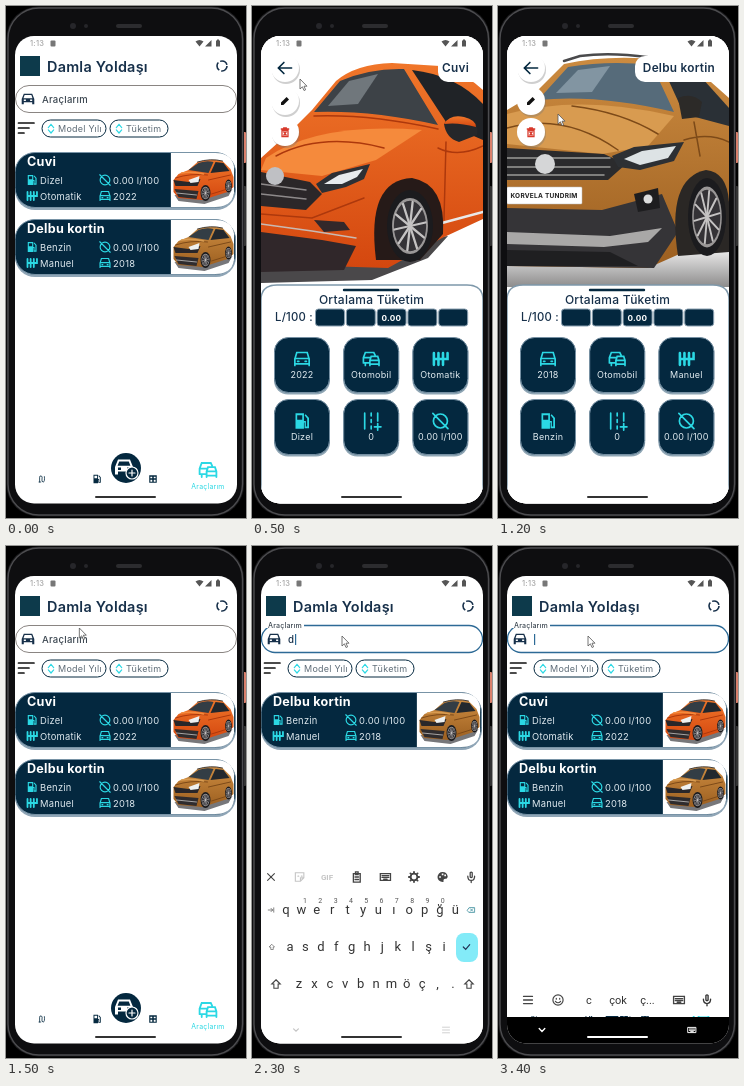
Write an HTML page that moves like this. It is 240 px wide and 512 px high and loops after 3500 ms.

```html
<!DOCTYPE html>
<html lang="tr">
<head>
<meta charset="utf-8">
<title>Araçlarım</title>
<style>
html, body { margin: 0; width: 100%; height: 100%; overflow: hidden; background: #000; }
svg { display: block; width: 240px; height: 512px; }
text { font-family: Inter, "Open Sans", sans-serif; letter-spacing: .25px; white-space: pre; }
.keys text { font-family: Roboto, sans-serif; letter-spacing: 0; }
</style>
</head>
<body>
<svg id="stage" viewBox="0 0 240 512"></svg>
<script>
const NAVY = '#04283f', CYAN = '#2bd8e4', INK = '#17304a';
const CARS = [
  { name: 'Cuvi', fuel: 'Dizel', gear: 'Otomatik', year: '2022', paint: 'url(#paint0)', shade: '#ad380c', light: '#f58a3c' },
  { name: 'Delbu kortin', fuel: 'Benzin', gear: 'Manuel', year: '2018', paint: 'url(#paint1)', shade: '#7d4a18', light: '#d89b50' }
];

// Icons are centred on 0,0 and about 12 units wide.
const ICONS = {
  car: ['M-6 5V0L-4 -5H4L6 0V5H4V3H-4V5ZM-4.3 -.8L-3.2 -3.7H3.2L4.3 -.8ZM-4 .4V2H-2V.4ZM2 .4V2H4V.4Z', 1],
  carLine: ['M-5.5 5V0L-4 -5H4L5.5 0V5M-5.5 -.4H5.5M-5.5 3.8H5.5M-3.4 1.8H-2.4M2.4 1.8H3.4'],
  cars: ['M-6 3V-1L-4.5 -5H2L3 -3M-6 -1H-1M-6 3H-2M-1 5V1L0 -2H5L6 1V5M-1 1H6M-1 4H6M-4.5 3V5'],
  fuel: ['M-5 6V-6H1.5V6ZM-3.7 -4.5V-1H.2V-4.5ZM1.5 0H3V4.2H4V-2L2 -4.4L2.8 -5.2L5.4 -2.4V5.5H2V1.2H1.5Z', 1],
  gear: ['M-5 -4.5V4.5M-1.5 -4.5V4.5M2 -4.5V4.5M5.5 -4.5V0H-5', 0, 2],
  none: ['M-5.4 0A5.4 5.4 0 1 0 5.4 0A5.4 5.4 0 1 0 -5.4 0M-5.8 -5.8L5.8 5.8'],
  road: ['M-5 -6V6M0 -6V-4M0 -1V1M0 4V6M5 -6V0M5 2V7M2.5 4.5H7.5'],
  sort: ['M-3 -1L0 -4.5L3 -1M-3 1.5L0 5L3 1.5'],
  back: ['M6 0H-6M-1 -5L-6 0L-1 5', 0, 1.5],
  pen: ['M-5 5V2L2 -5L5 -2L-2 5Z', 1],
  trash: ['M-4 -2V6H4V-2ZM-5 -4H5M-2 -5.5H2M-1.5 0L1.5 4M1.5 0L-1.5 4', 0, 1.7],
  route: ['M-4 5V-3Q-4 -6 -1 -5Q1 -4 0 0Q-1 5 2 5Q5 5 4 -4M-5 5H-2'],
  grid: ['M-5 -5H5V5H-5ZM-3.5 -3H-1V-1H-3.5ZM1 -3H3.5V-1H1ZM-3.5 1H-1V3.5H-3.5ZM1 1H3.5V3.5H1Z', 1],
  close: ['M-4 -4L4 4M4 -4L-4 4'],
  sticker: ['M-5 -5H5V1L1 5H-5ZM5 1H1V5M-2 -1H-1M2 -1H3'],
  clip: ['M-4 -4H4V6H-4ZM-1.5 -6H1.5V-3H-1.5ZM-2 0H2M-2 3H2', 0, 1.6],
  board: ['M-6 -4H6V4H-6ZM-4 -1.5H4M-4 .5H4M-2 2.5H2', 0, 1.5],
  cog: ['M-4 0A4 4 0 1 0 4 0A4 4 0 1 0 -4 0M0 -6V-4M0 4V6M-6 0H-4M4 0H6M-4.2 -4.2L-3 -3M4.2 -4.2L3 -3M-4.2 4.2L-3 3M4.2 4.2L3 3', 0, 2.2],
  palette: ['M0 -6A6 6 0 1 0 0 6Q2 6 1 4Q1 2 3 2Q6 2 6 -1Q5 -6 0 -6ZM-4 -1H-2V1H-4ZM-1 -4H1V-2H-1ZM2 -3H4V-1H2Z', 1],
  mic: ['M-1.2 -5Q0 -6.4 1.2 -5V0Q0 1.4 -1.2 0ZM-4 -1Q-4 4 0 4Q4 4 4 -1M0 4V6.5', 0, 1.5],
  menu: ['M-5 -4H5M-5 0H5M-5 4H5', 0, 1.4],
  smile: ['M-6 0A6 6 0 1 0 6 0A6 6 0 1 0 -6 0M-2 -2V-1M2 -2V-1M-3 1.5Q0 5 3 1.5', 0, 1.4],
  erase: ['M-6 0L-3 -4H6V4H-3ZM-1 -2L3 2M3 -2L-1 2'],
  shift: ['M0 -5L5 0H2.5V5H-2.5V0H-5Z'],
  tab: ['M-5 0H3M0 -3L3 0L0 3M5 -4V4'],
  check: ['M-4 0L-1 3L4 -3', 0, 1.5],
  down: ['M-4 -2L0 2L4 -2', 0, 2]
};

function icon(name, x, y, scale = 1, color = NAVY) {
  const [d, solid, width = 1.3] = ICONS[name];
  const look = solid ? `fill="${color}" fill-rule="evenodd"`
    : `fill="none" stroke="${color}" stroke-width="${width}" stroke-linecap="round"`;
  return `<path d="${d}" transform="translate(${x} ${y}) scale(${scale})" ${look}/>`;
}
const text = (s, x, y, size, color = INK, weight = 500, anchor = 'start', extra = '') =>
  `<text x="${x}" y="${y}" font-size="${size}" fill="${color}" font-weight="${weight}" text-anchor="${anchor}" ${extra}>${s}</text>`;
const rect = (x, y, w, h, r, fill, extra = '') =>
  `<rect x="${x}" y="${y}" width="${w}" height="${h}" rx="${r}" fill="${fill}" ${extra}/>`;
const circle = (x, y, r, fill, extra = '') => `<circle cx="${x}" cy="${y}" r="${r}" fill="${fill}" ${extra}/>`;
const oval = (x, y, rx, ry, fill) => `<ellipse cx="${x}" cy="${y}" rx="${rx}" ry="${ry}" fill="${fill}"/>`;
const shape = (d, fill, extra = '') => `<path d="${d}" fill="${fill}" ${extra}/>`;
const line = (d, color, width = 1, extra = '') =>
  `<path d="${d}" fill="none" stroke="${color}" stroke-width="${width}" stroke-linecap="round" ${extra}/>`;
const group = (id, body, extra = '') => `<g id="${id}" ${extra}>${body}</g>`;
const fade = (id, from, to) => `<linearGradient id="${id}" x2="0" y2="1"><stop stop-color="${from}"/><stop offset="1" stop-color="${to}"/></linearGradient>`;

function wheel(x, y, rx, ry) {
  let spokes = '';
  for (let i = 0; i < 10; i++) {
    const a = i * Math.PI / 5 - 1.4;
    spokes += line(`M${x} ${y}l${rx * .68 * Math.cos(a)} ${ry * .68 * Math.sin(a)}`, '#c4c2c2', rx * .1);
  }
  return oval(x, y, rx, ry, '#1b1b1e') + oval(x, y, rx * .78, ry * .78, '#9a9797') +
    oval(x, y, rx * .7, ry * .7, '#343236') + spokes;
}

// Small whole-car picture inside a card.
const thumb = c => rect(0, 0, 64, 54, 0, '#fff') +
  shape('M4 42L30 44L62 36L58 43L34 51L8 48Z', '#77777a') +
  shape('M3 27L8 21L18 17L27 9Q40 5 52 8L60 16L63 24V34L57 39L32 47L8 45L3 39Z', c.paint) +
  shape('M18 17L28 10Q36 7 43 9L38 20Z', '#333d45') +
  shape('M40 20L45 9L53 10L59 18Z', '#22282e') +
  line('M27 9Q40 5 52 8', '#443f3c', 1) +
  shape('M3 27L18 29L30 26L27 33L5 33Z', '#29272a') +
  shape('M4 36L28 38L26 46L8 44Z', '#2f2c2e') +
  line('M6 40L26 42', '#a5a3a2', 1) +
  line('M5 25Q20 20 37 22M38 27L60 22M41 41L57 36', c.shade, 1) +
  line('M11 20Q22 18 33 21', c.light, 1.5) +
  shape('M18 27L29 23L28 29L20 30Z', '#eff1f1') +
  wheel(35, 40, 5, 8) + wheel(58, 33, 3.4, 6.5);

const photos = [
  c => rect(9, 30, 222, 251, 0, '#fff') +
    shape('M9 238L110 240L196 230L176 252L120 274L9 277Z', '#4a484a') +
    shape('M9 152L40 124L60 104L84 75Q104 58 140 57L188 60Q214 68 231 84V213L190 232L136 262L9 258Z', c.paint) +
    shape('M62 106L88 75Q118 62 152 63L186 119Q120 104 62 106Z', '#3d4247') +
    shape('M76 100L97 75L126 68L106 98Z', '#70777c') +
    shape('M160 64Q204 69 231 98V134L196 119Z', '#202327') +
    shape('M14 152Q66 116 170 124L124 154L70 170L9 164Z', c.light) +
    line('M24 150Q70 126 132 142M62 110Q118 108 186 123', c.shade, 1.5) +
    shape('M192 118Q198 108 212 111Q228 114 225 129L207 136Q194 132 192 118Z', '#26272a') +
    shape('M192 118Q198 108 212 111Q224 114 224 121Q206 116 192 118Z', c.paint) +
    line('M186 142Q206 152 231 140M194 136L192 214', c.shade, 1.5) +
    line('M190 217L231 206', '#e9e9e9', 2.5) +
    shape('M9 166L58 176L70 188L54 204L9 200Z', '#2b2729') +
    line('M9 178L54 184M9 188L54 193', '#8d898a', 1.5) +
    circle(23, 170, 9, '#bfc0c4') +
    shape('M64 178L80 167L118 158L112 173L94 181L70 187Z', '#2d3035') +
    shape('M72 178L87 169L111 163L105 171L90 178Z', '#e7ebee') +
    shape('M9 226L70 234L104 240L92 264L9 266Z', '#30272a') +
    shape('M62 214L92 216L98 224L72 226Z', '#33282a') +
    line('M9 218L60 225L104 232', '#c9b9b2', 1.5) +
    line('M9 208L60 212L112 192', c.shade, 1.5) +
    shape('M124 254Q114 174 160 172Q194 178 191 228L168 254Z', '#261a18') +
    wheel(158, 220, 23, 36),
  c => rect(9, 30, 222, 251, 0, '#fff') +
    rect(9, 236, 222, 45, 0, 'url(#floor)') +
    shape('M9 104L36 88L66 58Q112 48 164 54L204 68L231 92V226L186 246L150 262L9 260Z', c.paint) +
    shape('M40 94L70 61Q112 54 154 59L176 106Q100 88 40 94Z', '#566b7a') +
    shape('M58 87L80 64L112 60L94 86Z', '#8295a2') +
    shape('M164 60L204 72L231 102V120L186 108Z', '#2a3036') +
    line('M66 55L82 50Q130 44 196 60', '#4a4a4c', 2.5) +
    shape('M9 108Q82 88 176 110L150 140L104 148L9 138Z', c.light) +
    line('M9 122Q66 106 120 144M74 100Q124 106 160 128', c.shade, 1.5) +
    shape('M180 92Q194 86 204 96L201 111L184 113Z', '#2c2a28') +
    line('M186 134Q210 126 231 136M196 116L202 150', c.shade, 1.5) +
    shape('M9 142L106 148L128 158L110 174L9 174Z', '#2b2b2d') +
    line('M9 152H112M9 161H112M9 169H106', '#9b9a98', 1.5) +
    circle(47, 158, 10, '#d5d6d7') +
    shape('M114 150L136 141L186 136L176 155L142 164L120 161Z', '#2d3034') +
    shape('M126 153L144 145L178 140L170 152L142 159Z', '#dde3e5') +
    shape('M9 202L104 204L164 188L180 226L156 262L9 260Z', '#353437') +
    shape('M9 226L112 230L164 222L150 236L106 241L9 238Z', '#a9a8a7') +
    shape('M9 244L112 246L140 260H9Z', '#1f1f21') +
    shape('M136 188L160 182L162 202L140 206Z', '#1d1d1f') + circle(150, 193, 4.5, '#dcdddd') +
    shape('M180 250Q168 172 208 164Q229 166 231 196V246Z', '#2a2725') +
    wheel(209, 211, 19, 39) +
    rect(9, 181, 75, 17, 1, '#fff', 'stroke="#bbb" stroke-width=".5"') +
    text('KORVELA TUNDRIM', 46, 192, 6.5, '#222', 700, 'middle')
];

function card(i) {
  const c = CARS[i];
  return group('card' + i,
    rect(9, 148, 221, 56, 20, '#8fa5b6') +
    rect(9, 146.5, 220.5, 55, 20, NAVY, 'stroke="#7893a6"') +
    `<g transform="translate(164.5 147)" clip-path="url(#cardEnd)">${thumb(c)}</g>` +
    text(c.name, 21, 160, 12.6, '#fff', 700) +
    icon('fuel', 26, 174, .85, CYAN) + text(c.fuel, 34, 177.5, 9.4, '#dfe9ef', 400) +
    icon('none', 99, 174, .9, CYAN) + text('0.00 l/100', 107, 177.5, 9.4, '#dfe9ef', 400) +
    icon('gear', 26, 190, .9, CYAN) + text(c.gear, 34, 193.5, 9.4, '#dfe9ef', 400) +
    icon('carLine', 99, 190, .9, CYAN) + text(c.year, 107, 193.5, 9.4, '#dfe9ef', 400));
}

const chip = (x, w, s) => rect(x, 114, w, 17, 8.5, '#fff', `stroke="${NAVY}"`) +
  icon('sort', x + 9, 122.5, .9, CYAN) + text(s, x + 16, 126, 9, '#5f6d78', 400);

const listView = rect(9, 30, 222, 468, 0, '#fff') +
  rect(14, 50, 20, 20, 0, '#0d3a4b') +
  text('Damla Yoldaşı', 41, 65.5, 14.4, INK, 600) +
  circle(216, 60, 5, 'none', `stroke="${INK}" stroke-width="1.6" stroke-dasharray="8.5 2"`) +
  rect(9.5, 79.5, 221, 27, 13.5, '#fff', 'id="field"') +
  icon('car', 22, 93, 1.05, INK) +
  rect(14, 77, 38, 5, 0, '#fff', 'id="notch"') +
  group('label', text('Araçlarım', 0, 0, 9.5, '#3b4650')) +
  text('', 36, 97, 9.7, INK, 500, 'start', 'id="query"') +
  rect(36, 88, 1.2, 11, 0, '#2d6a96', 'id="caret"') +
  line('M12.5 117H28M12.5 122H23M12.5 127H18', '#111', 1.7) +
  chip(36, 64, 'Model Yılı') + chip(104, 58, 'Tüketim') + card(0) + card(1) +
  icon('route', 36, 473, .6) + icon('fuel', 91, 473, .7) + icon('grid', 147, 473, .75) +
  circle(120, 462, 15, NAVY) + icon('car', 118, 461, 1.5, '#fff') +
  circle(126, 467, 6, NAVY, 'stroke="#fff" stroke-width="1.2"') + line('M123 467H129M126 464V470', '#fff', 1.2) +
  icon('cars', 202, 464, 1.4, CYAN) + text('Araçlarım', 202, 483, 6.9, CYAN, 400, 'middle');

const TILES = ['carLine', 'cars', 'gear', 'fuel', 'road', 'none'];
const tiles = TILES.map((name, i) => {
  const x = 22 + i % 3 * 69.2, y = i < 3 ? 331 : 393;
  return rect(x, y + 1.5, 56, 56, 14, '#8ea5b4') +
    rect(x + .5, y + .5, 55, 55, 14, NAVY, 'stroke="#7690a3"') +
    icon(name, x + 28, y + 22, 1.3, CYAN) +
    text('', x + 28, y + 41, 9, '#e2ecf1', 400, 'middle', `id="tile${i}"`);
}).join('');

let bars = '';
for (let i = 0; i < 5; i++) bars += rect(63.5 + i * 30.8, 303, 29, 17, 3, NAVY, 'stroke="#8aa0b1"');

const roundButton = (y, name, scale, color) => circle(34, y + 2, 14, '#777', 'opacity=".35"') +
  circle(33, y, 14, '#fff') + icon(name, 33, y, scale, color);

const detailView = shape('M9 294Q9 279 25 279H215Q231 279 231 294V499H9Z', '#fff', 'stroke="#7e98aa" stroke-width="1.5"') +
  line('M92 284H146', NAVY, 2.4) +
  text('Ortalama Tüketim', 119.5, 297.5, 12, INK, 500, 'middle') +
  text('L/100 :', 23, 314.5, 11.3) + bars +
  text('0.00', 139.5, 314.5, 8.2, '#fff', 700, 'middle') + tiles +
  roundButton(62, 'back', 1.1, NAVY) + roundButton(95, 'pen', .8, '#111') + roundButton(126, 'trash', .75, '#d8392b') +
  rect(137, 50, 110, 26, 10, '#fff', 'id="plate"') +
  text('', 217, 66, 11.8, INK, 600, 'end', 'id="carName"');

function keyRow(letters, x, y) {
  return [...letters].map((s, i) => text(s, x + i * 15.4, y, 13, '#333', 400, 'middle')).join('');
}
const TOOLS = ['close', 'sticker', '', 'clip', 'board', 'cog', 'palette', 'mic'];
const keyboard = rect(9, 317, 222, 181, 0, '#fff') +
  TOOLS.map((n, i) => n ? icon(n, 19 + i * 28.6, 331, .85, i === 1 ? '#c5c5c5' : '#444') : '').join('') +
  text('GIF', 75, 334, 8, '#c5c5c5', 700, 'middle') +
  [...'1234567890'].map((s, i) => text(s, 53 + i * 15.3, 357, 7, '#555', 400, 'middle')).join('') +
  icon('tab', 19, 364, .55, '#555') + keyRow('qwertyuıopğü', 34, 368) + icon('erase', 219, 364, .6, '#368a9a') +
  icon('shift', 20, 401, .5, '#555') + keyRow('asdfghjklşi', 38, 405) +
  rect(204, 387, 22, 29, 8, '#83ebf8') + icon('check', 214.5, 401, .8, '#235') +
  icon('shift', 24, 438, .85, '#444') + keyRow('zxcvbnmöç,.', 47, 442) + icon('shift', 217, 438, .85, '#444') +
  icon('down', 44, 484, .6, '#c4c4c4') + icon('menu', 194, 484, .7, '#d0d0d0');

const strip = rect(9, 438, 222, 32, 0, '#fff') + rect(9, 471, 222, 27, 0, '#000') +
  icon('menu', 30, 454, .9, '#444') + icon('smile', 60, 454, .85, '#444') +
  [91, 120, 149.5].map((x, i) => text('', x, 458, 11, '#333', 400, 'middle', `id="hint${i}"`)).join('') +
  icon('board', 181, 454, .9, '#444') + icon('mic', 209, 454, .9, '#333') +
  icon('down', 44, 484, .7, '#fff') + icon('board', 194, 484, .65, '#fff');

const statusBar = text('1:13', 24, 40, 7.5, '#a5a5a5') + rect(44.5, 34.5, 5, 6, 1, '#777') +
  shape('M189.5 35.5Q193.5 32.5 197.5 35.5L193.5 40.5ZM205.5 34V40.5H199ZM210 34.5H211V33.5H213V34.5H214V40.5H210Z', '#555');

const phone = rect(0, 0, 240, 512, 0, '#000') +
  rect(237, 126, 3, 31, 1, '#d9806c') + rect(237, 180, 3, 60, 1, '#333') +
  rect(.5, .5, 237.5, 510, 32, '#1b1b1d') +
  rect(2, 2, 234.5, 507, 31, '#0e0e10', 'stroke="#4c4c4f" stroke-width="1.4"') +
  rect(110, 18, 26, 4, 2, '#2c2c2f') + circle(67, 20, 3, '#26262a') + circle(80, 20, 2, '#26262a');

document.getElementById('stage').innerHTML =
  `<defs>
    ${fade('paint0', '#f0762a', '#d4470f')}${fade('paint1', '#cc8b40', '#9c5f20')}${fade('floor', '#fff', '#8d8c8c')}
    <clipPath id="screen"><rect x="9" y="30" width="222" height="467.5" rx="19"/></clipPath>
    <clipPath id="cardEnd"><path d="M0 0H45Q64 0 64 19V35Q64 54 45 54H0Z"/></clipPath>
    <clipPath id="photoBox"><rect x="9" y="30" width="222" height="251"/></clipPath>
  </defs>` + phone +
  `<g clip-path="url(#screen)">` + listView +
  group('keys', keyboard, 'class="keys"') + group('strip', strip, 'class="keys"') +
  rect(9, 30, 222, 468, 0, '#fff', 'id="veil"') +
  group('hero', photos.map((draw, i) => group('photo' + i, draw(CARS[i]))).join(''), 'clip-path="url(#photoBox)"') +
  group('detail', detailView) + statusBar +
  line('M90 491H149', '#333', 2, 'id="pill"') +
  shape('M0 0V10L2.4 7.8L4 11.5L5.6 10.8L4 7.2H7Z', '#fff', 'id="pointer" stroke="#555" stroke-width=".8"') + '</g>';

// Each row: time in ms, then values.
const TRACKS = {
  open: [[0, 0], [200, 0], [400, 1], [600, 1], [800, 0], [900, 0], [1100, 1], [1300, 1], [1500, 0]],
  pointer: [[0, 62, 178], [300, 62, 178], [500, 48, 73], [700, 40, 64], [900, 60, 240], [1000, 60, 240],
    [1200, 60, 108], [1300, 40, 66], [1600, 90, 90]],
  float: [[0, 0], [1700, 0], [1800, .6], [1900, 1]],
  sink: [[0, 180], [1800, 180], [1900, 105], [2000, 30], [2100, 0]]
};
const QUERIES = [[0, ''], [2300, 'd'], [2800, ''], [3000, 'c'], [3300, '']];
const HINTS = [[0, 'd da de'], [2800, 'Bir bu en'], [3000, 'c çok ç...']];

const mix = (a, b, p) => a + (b - a) * p;
function at(track, t) {
  const i = track.findLastIndex(row => row[0] <= t), a = track[i], b = track[i + 1] || a;
  const p = a === b ? 0 : (t - a[0]) / (b[0] - a[0]);
  return a.slice(1).map((v, k) => mix(v, b[k + 1], p));
}
const held = (rows, t) => rows.findLast(row => row[0] <= t)[1];

const parts = {};
document.querySelectorAll('#stage [id]').forEach(el => parts[el.id] = el);
const set = (id, name, value) => parts[id].setAttribute(name, value);
const show = (id, on) => set(id, 'display', on ? 'inline' : 'none');
const write = (id, s) => { if (parts[id].textContent !== s) parts[id].textContent = s; };

function draw(t) {
  const [open] = at(TRACKS.open, t), [float] = at(TRACKS.float, t), [sink] = at(TRACKS.sink, t);
  const pick = t < 850 ? 0 : 1, car = CARS[pick];
  const query = held(QUERIES, t), typing = t >= 2400, focused = float === 1;

  const found = CARS.map(c => c.name.toLowerCase().startsWith(query));
  found.forEach((on, i) => show('card' + i, on));
  set('card1', 'transform', `translate(0 ${found[0] ? 67 : 0})`);

  set('label', 'transform', `translate(${mix(36, 16, float)} ${mix(97, 82, float)}) scale(${mix(1, .74, float)})`);
  set('field', 'stroke', focused ? '#2d6a96' : '#8a8582');
  set('field', 'stroke-width', focused ? 1.3 : 1);
  show('notch', focused);
  show('caret', float > 0);
  set('caret', 'x', query ? 43 : 36);
  write('query', query);

  show('keys', sink < 180 && !typing);
  set('keys', 'transform', `translate(0 ${sink})`);
  show('strip', typing);
  held(HINTS, t).split(' ').forEach((s, i) => write('hint' + i, s));
  set('pill', 'stroke', typing ? '#fff' : '#333');

  for (const id of ['veil', 'hero', 'detail']) show(id, open > 0);
  set('veil', 'opacity', open);
  set('detail', 'opacity', open);
  photos.forEach((_, i) => show('photo' + i, i === pick));
  const x = mix(164.5, 9, open), y = mix(147 + pick * 67, 30, open);
  const sx = mix(64 / 222, 1, open), sy = mix(54 / 251, 1, open);
  set('hero', 'transform', `translate(${x} ${y}) scale(${sx} ${sy}) translate(-9 -30)`);
  write('carName', car.name);
  set('plate', 'x', pick ? 137 : 186);
  [car.year, 'Otomobil', car.gear, car.fuel, '0', '0.00 l/100'].forEach((s, i) => write('tile' + i, s));

  show('pointer', t > 0);
  set('pointer', 'transform', `translate(${at(TRACKS.pointer, t).join(' ')})`);
}

function tick() {
  draw(Math.floor(performance.now() % 3500 / 100) * 100);
  requestAnimationFrame(tick);
}
tick();
</script>
</body>
</html>
```
